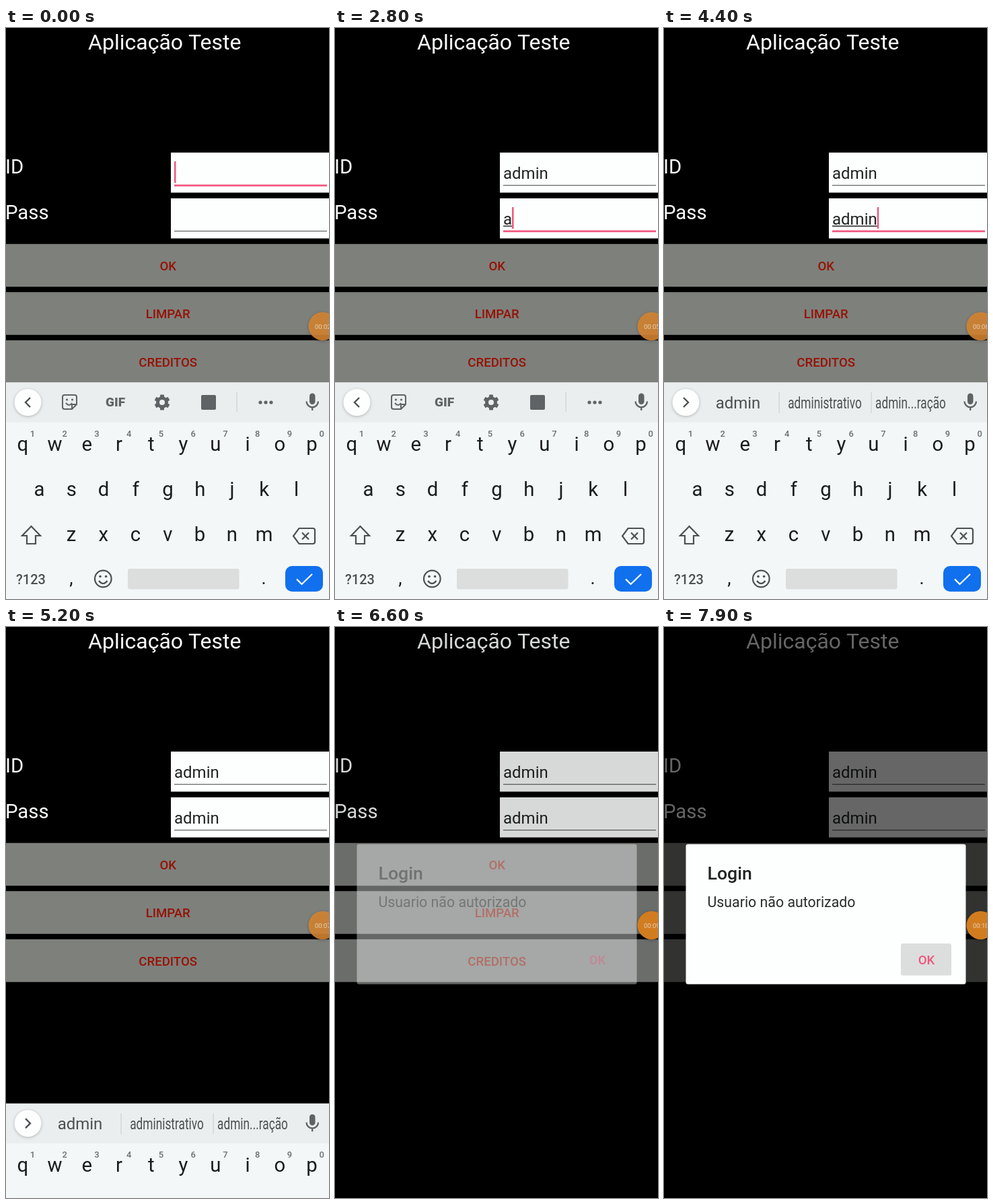
An HTML page with a canvas for the animation above (8000 ms loop, 480x848 px).

```html
<!DOCTYPE html>
<html lang="pt">
<head>
<meta charset="utf-8">
<title>Aplicação Teste</title>
<style>
  html, body { margin: 0; width: 100%; height: 100%; overflow: hidden; background: #000; }
  canvas { display: block; width: 480px; height: 848px; }
</style>
</head>
<body>
<canvas id="stage" width="480" height="848"></canvas>
<script>
const ctx = document.getElementById('stage').getContext('2d');
const LOOP = 8000, STEP = 100;
const PINK = '#f2567f', INK = '#212323', ICON = '#5f6366', KEY_INK = '#1a1c1d';
const WORD = 'admin';

// Times at which each letter of WORD lands in the field.
const fields = [
  { top: 185, keys: [600, 800, 1100, 1300, 1600], popupFrom: 500 },
  { top: 253, keys: [2800, 3000, 3200, 3300, 3500], popupFrom: 2900 }
];
const cursorHidden = [[200, 500], [2500, 2800], [3900, 4400], [4900, 5200]];
const suggestions = [
  ['a', 'as', 'ao'],
  ['ad', 'adoro', 'adorei'],
  ['adm', 'admin', 'admiro'],
  ['admi', 'admiro', 'admin...rativo'],
  ['admin', 'administrativo', 'admin...ração']
];
const rows = [
  { keys: 'qwertyuiop', x: 24.8, y: 628 },
  { keys: 'asdfghjkl', x: 49.5, y: 695 },
  { keys: 'zxcvbnm', x: 97, y: 762 }
];
const KEY_STEP = 47.75;

const ramp = (t, from, to) => Math.min(1, Math.max(0, (t - from) / (to - from)));

function text(str, x, y, size, color, { align = 'left', weight = 400, squeeze = 1 } = {}) {
  ctx.save();
  ctx.font = `${weight} ${size}px Roboto, sans-serif`;
  ctx.textAlign = align;
  ctx.fillStyle = color;
  ctx.translate(x, y);
  ctx.scale(squeeze, 1);
  ctx.fillText(str, 0, 0);
  ctx.restore();
}
const centered = (str, x, y, size, color, weight = 400, squeeze = 1) =>
  text(str, x, y, size, color, { align: 'center', weight, squeeze });

function box(x, y, w, h, color, radius = 0) {
  ctx.fillStyle = color;
  ctx.beginPath();
  ctx.roundRect(x, y, w, h, radius);
  ctx.fill();
}
function disc(x, y, r, color) {
  ctx.fillStyle = color;
  ctx.beginPath();
  ctx.arc(x, y, r, 0, Math.PI * 2);
  ctx.fill();
}
function line(d, color = ICON, width = 2) {
  ctx.strokeStyle = color;
  ctx.lineWidth = width;
  ctx.stroke(new Path2D(d));
}
function shadowed(blur, dy, alpha, draw) {
  ctx.save();
  ctx.shadowColor = `rgba(0,0,0,${alpha})`;
  ctx.shadowBlur = blur;
  ctx.shadowOffsetY = dy;
  draw();
  ctx.restore();
}
function faded(alpha, draw) {
  ctx.save();
  ctx.globalAlpha *= alpha;
  draw();
  ctx.restore();
}

const focusAt = t => t < 2000 ? 0 : t < 5200 ? 1 : -1;
const countBy = (keys, t) => keys.filter(at => at <= t).length;

function drawField({ top, keys }, focused, t) {
  const typed = WORD.slice(0, countBy(keys, t));
  box(245, top, 235, 59.5, '#fdfffe');
  text(typed, 250, top + 38.5, 24, INK);
  ctx.font = '400 24px Roboto, sans-serif';
  const width = ctx.measureText(typed).width;
  if (!focused) {
    box(250, top + 48, 227, 1.2, '#666867');
    return;
  }
  box(250, top + 47.5, 227, 2.7, PINK);
  if (typed) box(250, top + 40.5, width, 1.4, INK);
  if (!cursorHidden.some(([from, to]) => t >= from && t < to)) {
    box(250 + width, top + 13, 2.5, 32, PINK);
  }
}

function drawForm(t) {
  centered('Aplicação Teste', 235.8, 32, 32, '#fdfffe');
  text('ID', -1, 216, 29.33, '#fdfffe');
  text('Pass', -1, 284, 29.33, '#fdfffe');
  fields.forEach((field, i) => drawField(field, focusAt(t) === i, t));
  ['OK', 'LIMPAR', 'CREDITOS'].forEach((label, i) => {
    const y = 320.7 + i * 71.5;
    box(-1, y, 482, 63.5, '#7e807c', 2);
    if (i === 0) drawRipple(y, t);
    centered(label, 240.7, y + 38.8, 18.67, '#961205', 500);
  });
}

function drawRipple(y, t) {
  const grow = ramp(t, 5800, 6100), fade = 1 - ramp(t, 6200, 6400);
  if (!grow || !fade) return;
  ctx.save();
  ctx.beginPath();
  ctx.rect(0, y, 480, 63.5);
  ctx.clip();
  disc(240, y + 32, 250 * grow, `rgba(255,255,255,${0.18 * fade})`);
  ctx.restore();
}

function drawGear(x, y) {
  ctx.save();
  ctx.translate(x, y);
  for (let i = 0; i < 6; i++) {
    ctx.rotate(Math.PI / 3);
    box(-3, -11.5, 6, 7, ICON, 1);
  }
  disc(0, 0, 9, ICON);
  disc(0, 0, 4, '#eaeeee');
  ctx.restore();
}

function drawTools() {
  line('M87 545H102Q105 545 105 548V559L98 566H87Q84 566 84 563V548Q84 545 87 545ZM98 566V559H105');
  disc(90.5, 552, 1.6, ICON);
  disc(98.5, 552, 1.6, ICON);
  line('M89 557Q94 563 98 557');
  centered('GIF', 162.5, 562, 19, ICON, 900);
  drawGear(232, 556);
  box(290, 545, 22, 22, ICON, 2);
  box(342.5, 541, 1.2, 29, '#cdd1d2');
  [378, 386, 394].forEach(x => disc(x, 556, 2.6, ICON));
}

function drawWords(words) {
  [110, 239, 366.5].forEach((x, i) => {
    const squeeze = words[i].length > 10 ? 0.72 : 1;
    centered(words[i], x, 565, 24, '#4c5053', 400, squeeze);
  });
  [170.5, 307.5].forEach(x => box(x, 541, 1.2, 31, '#cdd1d2'));
}

function drawToolbar(t) {
  const focus = focusAt(t);
  const count = focus < 0 ? 5 : countBy(fields[focus].keys, t - 100);
  box(0, 526.5, 480, 59, '#eaeeee');
  shadowed(4, 1, 0.25, () => disc(32.5, 556, 20, '#fdfffe'));
  line(count ? 'M29 549L36 556L29 563' : 'M36 549L29 556L36 563', '#4c5053', 2.4);
  if (count) drawWords(suggestions[count - 1]);
  else faded(focus === 1 ? ramp(t, 1900, 2300) : 1, drawTools);
  box(451, 542.5, 8.5, 16.5, ICON, 4.2);
  line('M446.5 554.5A8.7 8.7 0 0 0 464 554.5M455.2 563V568', ICON, 2.3);
}

function drawPopup(t) {
  for (const { keys, popupFrom } of fields) {
    const i = keys.findIndex(at => at - 100 <= t && t < at);
    if (i < 0 || t < popupFrom) continue;
    const row = rows.find(r => r.keys.includes(WORD[i]));
    const x = row.x + KEY_STEP * row.keys.indexOf(WORD[i]);
    shadowed(5, 2, 0.3, () => box(x - 25.5, row.y - 131, 51, 149, '#edf1f1', 5));
    centered(WORD[i], x, row.y - 79, 37, KEY_INK);
  }
}

function drawKeyboard(t) {
  const slide = ramp(t, 4900, 5300) ** 2;
  if (slide === 1) return;
  ctx.save();
  ctx.translate(0, 322 * slide);
  box(0, 526.5, 480, 322, '#f3f7f7');
  drawToolbar(t);
  rows.forEach(({ keys, x, y }, r) => [...keys].forEach((key, i) => {
    centered(key, x + KEY_STEP * i, y, 29.33, KEY_INK);
    if (r === 0) centered((i + 1) % 10, 39.5 + KEY_STEP * i, 607, 13, '#6b6f72', 500);
  }));
  line('M37.5 740L51 754H44V766H31V754H24Z', '#4c5053', 2.2);
  line('M435.5 743H456Q459 743 459 746V763Q459 766 456 766H435.5L427 754.5ZM440 749.5L450 759.5M450 749.5L440 759.5', '#4c5053', 2.2);
  centered('?123', 37, 825.5, 20, '#4c5053', 500);
  centered(',', 97, 826, 27, KEY_INK);
  centered('.', 383, 826, 27, KEY_INK);
  line('M132 818a12.3 12.3 0 1 0 24.6 0a12.3 12.3 0 1 0 -24.6 0M138 821Q144.3 829 150.5 821', '#4c5053', 2.2);
  disc(140, 814.5, 1.8, '#4c5053');
  disc(148.6, 814.5, 1.8, '#4c5053');
  box(181, 803, 165.5, 30.5, '#dcdedd', 3);
  box(415, 799, 56, 38, '#1070ee', 10);
  line('M432 818.5L439.5 826L455 811', '#fff', 2.3);
  drawPopup(t);
  ctx.restore();
}

function drawDialog(t) {
  const dim = 0.6 * ramp(t, 6500, 6900), alpha = ramp(t, 6500, 6750);
  if (!alpha) return;
  box(0, 0, 480, 848, `rgba(0,0,0,${dim})`);
  faded(alpha, () => {
    box(32.5, 322.5, 416, 208, '#fdfffe', 3);
    text('Login', 64.5, 375.3, 26.67, INK, { weight: 500 });
    text('Usuario não autorizado', 64.5, 416, 21.33, '#2b2d2d');
    const press = ramp(t, 7700, 7900);
    if (press) faded(press, () => box(352, 470, 75, 47.5, '#dcdedd', 3));
    centered('OK', 390, 501, 18.67, PINK, 500);
  });
}

function drawRecorder(t) {
  const seconds = String(Math.floor(t / 1000 + 2.5)).padStart(2, '0');
  const color = t < 6500 ? 'rgba(214,134,48,.88)' : '#d27c20';
  shadowed(4, 1, 0.3, () => disc(470.5, 443, 21, color));
  text(`00:${seconds}`, 459, 446.5, 9.5, '#e6cfb4');
}

function frame() {
  const t = Math.floor(performance.now() / STEP) * STEP % LOOP;
  box(0, 0, 480, 848, '#000');
  drawForm(t);
  drawKeyboard(t);
  drawDialog(t);
  drawRecorder(t);
  requestAnimationFrame(frame);
}
frame();
</script>
</body>
</html>
```
